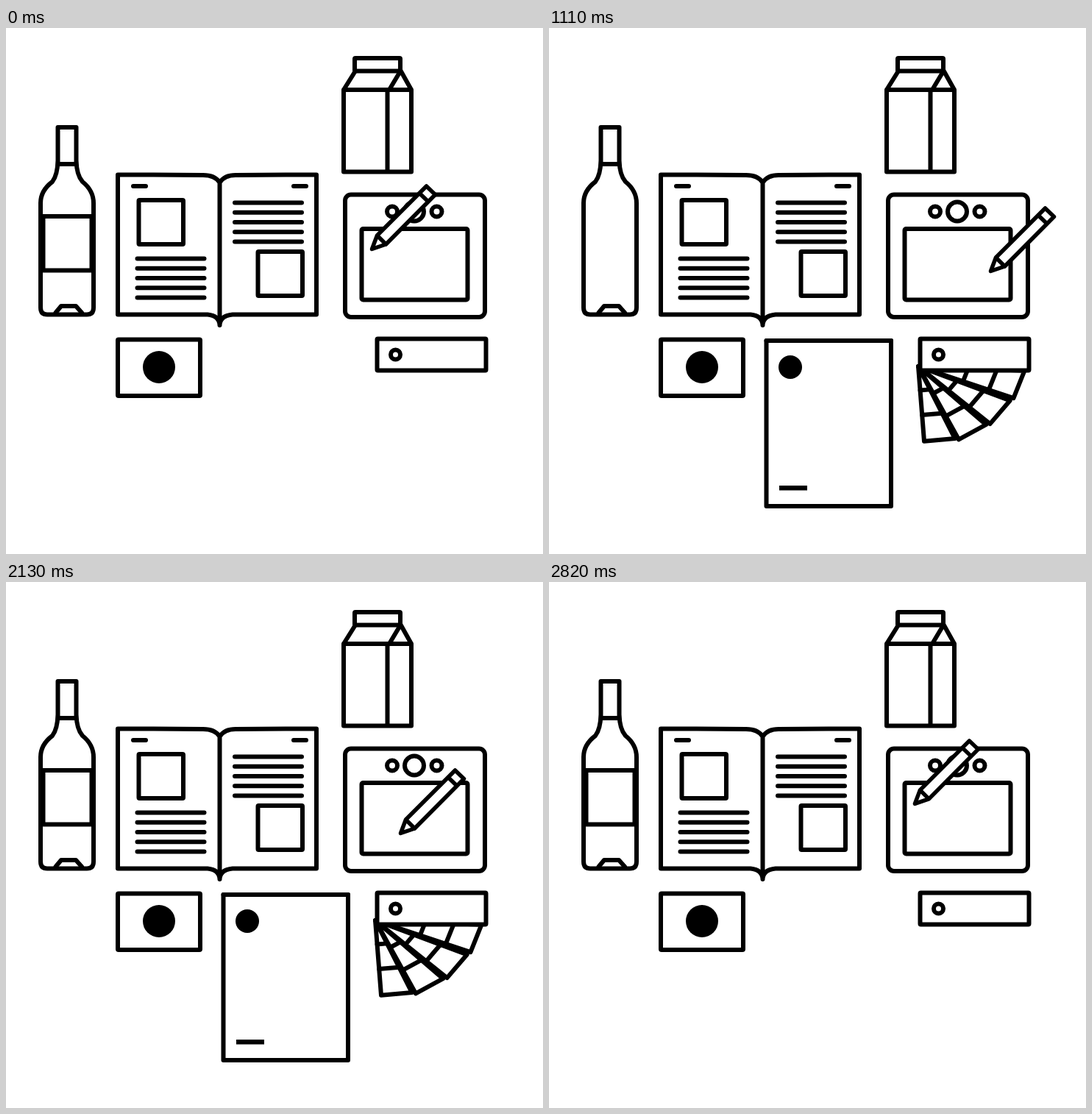
Animation of 730 by 715 pixels, one loop 2850 ms. Source, as an HTML page with a canvas:

```html
<!DOCTYPE html>
<html lang="en">
<head>
<meta charset="utf-8">
<title>Design studio icons</title>
<style>
html, body { margin: 0; width: 100%; height: 100%; overflow: hidden; background: #fff; }
canvas { display: block; }
</style>
</head>
<body>
<canvas id="stage" width="730" height="715"></canvas>
<script>
const c = document.getElementById('stage').getContext('2d');
const LOOP = 2850, STEP = 30;

// Progress from 0 to 1 between two times, steady or eased.
const span = (from, to, t) => Math.min(1, Math.max(0, (t - from) / (to - from)));
const ease = (from, to, t) => {
  const u = span(from, to, t);
  return u * u * (3 - 2 * u);
};

function draw(d, fill) {
  const p = new Path2D(d);
  if (fill) c.fill(p);
  c.stroke(p);
}
function box(x1, y1, x2, y2, r = 1) {
  c.beginPath();
  c.roundRect(x1, y1, x2 - x1, y2 - y1, r);
  c.fill();
  c.stroke();
}
function ring(x, y, r) {
  c.beginPath();
  c.arc(x, y, r, 0, 7);
  c.fill();
  c.stroke();
}
function disc(x, y, r) {
  c.beginPath();
  c.arc(x, y, r, 0, 7);
  c.fillStyle = '#000';
  c.fill();
  c.fillStyle = '#fff';
}
function group(body) {
  c.save();
  body();
  c.restore();
}

function carton() {
  box(474, 41, 536, 58.5);
  draw('M474 60L459 84V195.5H551V84L536.5 58L521 84M459 84H551M518.5 84V195');
}

function book() {
  draw('M152 199.5L200 199.5L268 200Q284 200 290.5 210Q297 200 312 200L380 199.5H422V389.5H308' +
    'Q291 391 290.5 404Q290 391 274 389.5H152ZM290.5 208V404');
  draw('M173 215H190M391 215H408');
  box(180.5, 234, 241, 294);
  box(342.5, 304, 403, 364);
  for (let i = 0; i < 5; i++) {
    const y = 13.25 * i;
    draw(`M311 ${237.5 + y}H402M178.5 ${313.5 + y}H269.5`);
  }
}

// The bottle spins, so the label turns out of view on the left and back in from the right.
function bottle(t) {
  draw('M70.5 185V135H95.5V185ZM70.5 180Q70 200 63 209Q47 221 47 238V380Q47 389.5 56 389.5' +
    'H110Q119 389.5 119 380V238Q119 221 104 209Q96 200 95.5 180');
  draw('M67.5 387L75 378H95L103 387');
  const edge = turn => 83.5 + 33 * Math.cos(Math.PI * turn);
  const right = edge(t < 1080 ? span(330, 1050, t) : 0);
  const left = edge(t < 1080 ? 1 : span(1080, 1620, t));
  if (right - left > 1) draw(`M${left} 256H${right}V329.5H${left}Z`);
}

function tablet() {
  box(461, 226.5, 651, 393, 8);
  box(483.5, 273, 627.5, 369.5, 2);
  ring(525, 249.5, 7);
  ring(555, 249.5, 13);
  ring(585.5, 249.5, 7);
}

// Time and offset of each turning point of the stroke.
const strokePoints = [
  [0, 0, 0], [390, 34, 14], [540, 85, 8], [780, 110, -2],
  [1110, 103, 30], [1650, 65.5, 35.5], [2130, 39, 41], [2580, -1, 8], [LOOP, 0, 0]
];
function pencil(t) {
  const i = strokePoints.findIndex(p => p[0] > t);
  const [t0, x0, y0] = strokePoints[i - 1], [t1, x1, y1] = strokePoints[i];
  const u = span(t0, t1, t);
  group(() => {
    c.translate(x0 + (x1 - x0) * u, y0 + (y1 - y0) * u);
    c.lineWidth = 5.5;
    draw('M497.5 300.5L504.5 282L571.5 215L583.5 226.5L516.5 294ZM504.5 282L516.5 294M562 224.5L574 236', true);
  });
}

function swatches(t) {
  const tilt = ease(240, 390, t) - ease(390, 750, t) + ease(2190, 2490, t) - ease(2610, 2760, t);
  const open = ease(400, 750, t) - ease(2190, 2520, t);
  const angle = i => 85.5 - 25.5 * i + 1.05 * i * i;
  const at = (deg, r) => {
    const a = deg * open * Math.PI / 180;
    return `${r * Math.cos(a)} ${r * Math.sin(a)}`;
  };
  group(() => {
    c.translate(502, 460);
    c.rotate(-8.1 * tilt * Math.PI / 180);
    for (let i = 3; i >= 0 && open > 0; i--) {
      const r = 102 + 11.5 * i;
      const across = k => `M${at(angle(i), r * k)}L${at(angle(i + 1) + 2, (r + 8) * k)}`;
      draw(across(1) + 'L0 0Z', true);
      draw(across(.32 + .05 * i) + across(.65 + .03 * i));
    }
    c.translate(-502, -460);
    box(504.5, 422.5, 652.5, 465.5);
    ring(529.5, 444, 6.5);
  });
}

// The sheet peels down from its top left corner; u is how far it is rolled up.
function letter(t) {
  const u = 1 - span(30, 480, t) + span(2310, 2760, t);
  if (u >= 1) return;
  const late = (u / .6) ** 3, h = 8 * Math.min(1, 5 * u), hook = 8 * Math.min(1, late);
  const l = 425 + 196 * u ** .63, r = Math.min(650, 425 + 83 * late);
  const tipX = 295.5 + 103.6 * u ** .57, tipY = 425 + 329 * u ** .85;
  const endX = 465 + 11 * Math.min(1, late), endY = 425 + 129 * late;
  const bend = Math.max(0, Math.sin(Math.PI * u / .6));
  const corner = `M${295.5 + h * 1.3} ${l}`;
  const sheet = `${corner}Q296 ${l} 295.5 ${l + h * 1.6}V650H465V${r + hook * 1.6}` +
    `Q465 ${r} ${465 + hook} ${r - hook / 4}`;
  const flap = `${corner}Q${295.5 + h * 2.5} ${l - h * .2} ${tipX} ${tipY}` +
    `Q${(tipX + endX) / 2 - 12 * bend} ${(tipY + endY) / 2 - 37 * bend} ${endX} ${endY}`;
  group(() => {
    c.beginPath();
    c.rect(290, 420, 183, 235);
    c.clip();
    group(() => {
      c.clip(new Path2D(sheet + 'Z'));
      disc(328, 461, 16);
      c.fillStyle = '#000';
      c.fillRect(313, 622, 38, 6.5);
    });
    if (u > 0) group(() => {
      const back = new Path2D(`${flap}L465 ${r}Z`);
      c.fill(back);
      c.clip(back);
      disc(tipX + 5, tipY - 47, 15);
    });
    draw(sheet);
    draw(flap);
  });
}

function frame(now) {
  const t = Math.floor(now % LOOP / STEP) * STEP;
  c.fillStyle = '#fff';
  c.fillRect(0, 0, 730, 715);
  c.strokeStyle = '#000';
  c.lineWidth = 6;
  c.lineCap = c.lineJoin = 'round';
  carton();
  book();
  bottle(t);
  box(152, 423.5, 264, 500);
  disc(208, 461, 22);
  tablet();
  swatches(t);
  letter(t);
  pencil(t);
}

const start = performance.now();
function tick() {
  frame(performance.now() - start);
  requestAnimationFrame(tick);
}
tick();
</script>
</body>
</html>
```
